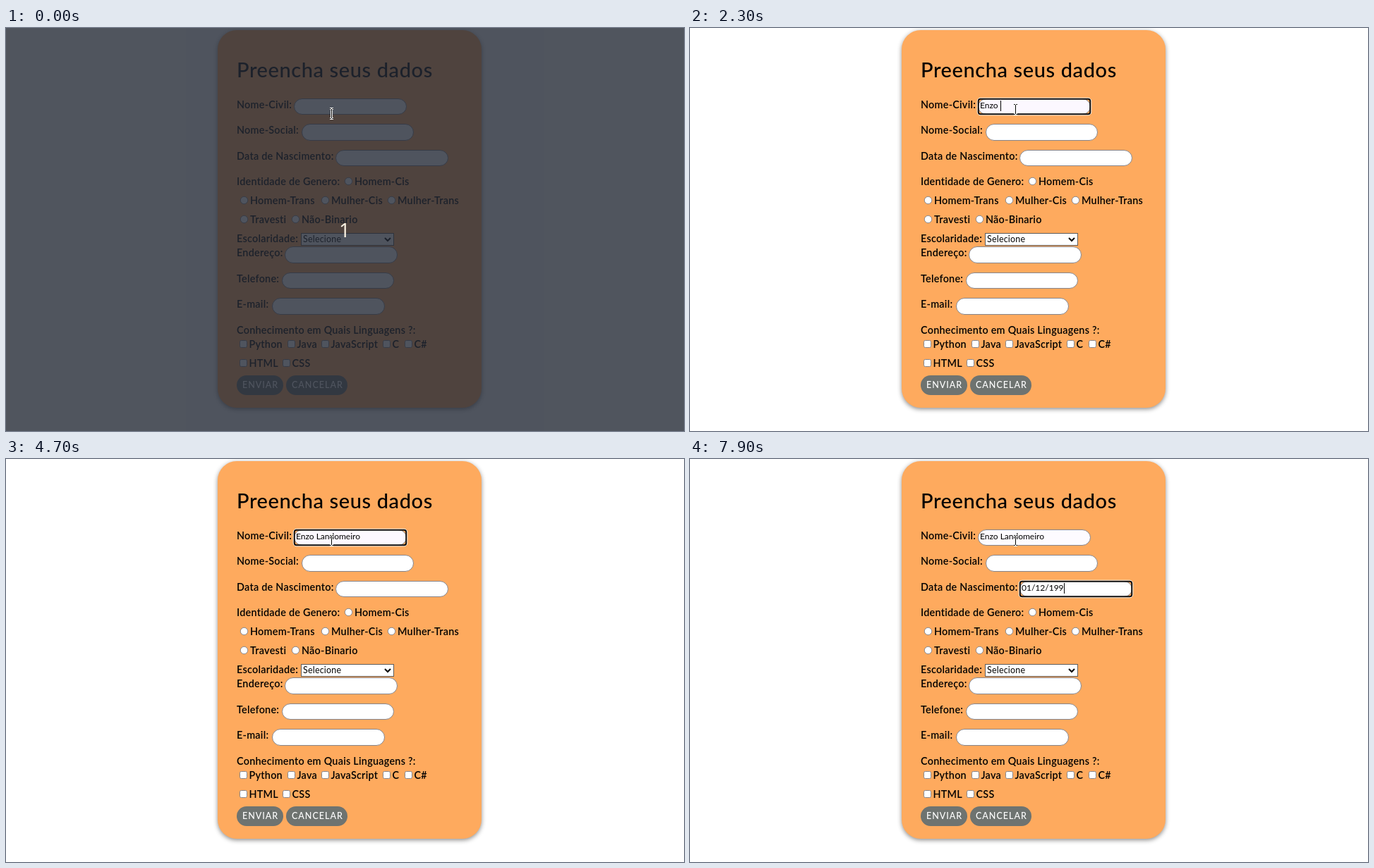
An HTML page that plays this animation: 961 by 572 pixels, repeating every 8000 ms.

```html
<!DOCTYPE html>
<html lang="pt-BR">
<head>
<meta charset="utf-8">
<title>Formulário</title>
<style>
  html, body { margin: 0; width: 100%; height: 100%; overflow: hidden; background: #fff; }
  svg { display: block; width: 961px; height: 572px; font-family: Lato, "Open Sans", sans-serif; }
  #card { filter: drop-shadow(0 2px 3px rgba(0, 0, 0, .45)); }
  .title { font-size: 29px; font-weight: 500; letter-spacing: .6px; }
  .label { font-size: 14.4px; font-weight: 600; letter-spacing: .25px; }
  .value { font-size: 12px; }
  .option { font-size: 12.4px; letter-spacing: .25px; }
  .button { font-size: 12.5px; font-weight: 500; letter-spacing: 1px; fill: #fff; }
  .count { font: 28px "Open Sans", "Noto Sans", sans-serif; fill: #fff6e6; text-anchor: middle; }
  .box { fill: #fff; stroke: #85858c; }
  .ibeam { fill: none; stroke: #fff; stroke-width: 3; }
  .ibeam + .ibeam { stroke: #000; stroke-width: 1; }
</style>
</head>
<body>
<svg id="stage" viewBox="0 0 961 572">
  <rect id="card" x="300" y="3" width="374" height="536" rx="27" fill="#feaa5e"/>
</svg>
<script>
const LOOP = 8000;
const stage = document.getElementById('stage');

function add(tag, attrs, text) {
  const el = document.createElementNS('http://www.w3.org/2000/svg', tag);
  for (const key in attrs) el.setAttribute(key, attrs[key]);
  if (text) el.textContent = text;
  return stage.appendChild(el);
}
const write = (style, x, y, text) => add('text', { class: style, x, y }, text);
const show = (el, on) => el.setAttribute('visibility', on ? 'visible' : 'hidden');

// Text fields: label, baseline, then the box
function field(label, base, x, y, w, h) {
  write('label', 327, base, label);
  const el = add('rect', { class: 'box', x: x + .5, y: y + .5, width: w - 1, height: h - 1, rx: 11.5 });
  return { el, x, y, w, h, base };
}
function radio(x, y, label) {
  add('circle', { class: 'box', cx: x, cy: y, r: 5.2 });
  write('label', x + 8.5, y + 5.5, label);
}
function check(x, y, label) {
  add('rect', { class: 'box', x: x - 5, y: y - 5.5, width: 10, height: 10, rx: 2 });
  write('label', x + 8, y + 5, label);
}
function button(x, w, label) {
  add('rect', { x, y: 493, width: w, height: 28, rx: 14, fill: '#6e7370' });
  write('button', x + 8, 511, label);
}

write('title', 327, 70, 'Preencha seus dados');
const civil = field('Nome-Civil:', 114, 408, 100, 160, 23);
const social = field('Nome-Social:', 150, 419, 136, 159, 24);
const birth = field('Data de Nascimento:', 187, 467, 173, 160, 23);

write('label', 327, 223, 'Identidade de Genero:');
radio(485.5, 217.5, 'Homem-Cis');
radio(337.5, 244.5, 'Homem-Trans');
radio(452.5, 244.5, 'Mulher-Cis');
radio(546.5, 244.5, 'Mulher-Trans');
radio(337.5, 271.5, 'Travesti');
radio(410.5, 271.5, 'Não-Binario');

write('label', 327, 304, 'Escolaridade:');
add('rect', { x: 418.5, y: 291.5, width: 131, height: 17, fill: '#fff', stroke: '#5c5c5c' });
write('option', 421, 304, 'Selecione');
add('path', { d: 'M537 298l4 4 4-4', fill: 'none', stroke: '#000', 'stroke-width': 2 });

field('Endereço:', 324, 395, 310, 160, 24);
field('Telefone:', 361, 391, 347, 159, 23);
field('E-mail:', 397, 377, 383, 160, 24);

write('label', 327, 434, 'Conhecimento em Quais Linguagens ?:');
check(336.5, 449, 'Python');
check(404.5, 449, 'Java');
check(452.5, 449, 'JavaScript');
check(539.5, 449, 'C');
check(570.5, 449, 'C#');
check(336.5, 476, 'HTML');
check(397.5, 476, 'CSS');
button(327, 66, 'ENVIAR');
button(397, 87, 'CANCELAR');

// Focus ring, typed values and caret
const halo = add('rect', { rx: 4.5, fill: 'none', stroke: '#fff' });
const ring = add('rect', { rx: 3, fill: 'none', stroke: '#101010', 'stroke-width': 2 });
const caret = add('rect', { width: 1, height: 15, fill: '#000' });

function typed(target, text, times) {
  target.text = write('value', target.x + 3, target.base, '');
  target.full = text.replace(/ /g, '\u00a0');
  target.times = times;
}
typed(civil, 'Enzo Landomeiro', [1500, 1600, 1800, 2200, 2300, 2700, 3000, 3100,
  3300, 3400, 3600, 3700, 3800, 4000, 4200]);
typed(birth, '01/12/199', [5800, 6000, 6700, 6900, 7000, 7300, 7400, 7700, 7900]);
typed(social, '', []);

const veil = add('rect', { width: 961, height: 572, fill: '#242a36', 'fill-opacity': .8 });
const count = write('count', 480, 297, '1');

const pointer = add('g', {});
const beam = 'M-2.5-7H-1L0-6 1-7H2.5M0-6V6M-2.5 7H-1L0 6 1 7H2.5';
for (let i = 0; i < 2; i++) pointer.append(add('path', { class: 'ibeam', d: beam }));

// Each step holds from its time until the next one
const focusSteps = [[0, null], [300, civil], [5000, social], [5100, birth]];
const pointerSteps = [[0, 121.5], [100, 119.5], [200, 117.5], [300, 115.5]];
const caretSteps = [[0, false], [300, true], [900, false], [1500, true], [4700, false], [5000, true]];
const at = (steps, t) => steps.filter(s => s[0] <= t).pop()[1];

function outline(el, f, grow) {
  el.setAttribute('x', f.x - grow);
  el.setAttribute('y', f.y - grow);
  el.setAttribute('width', f.w + 2 * grow);
  el.setAttribute('height', f.h + 2 * grow);
}

function draw(t) {
  show(veil, t < 100);
  show(count, t < 100);
  pointer.setAttribute('transform', `translate(461.5 ${at(pointerSteps, t)})`);

  for (const f of [civil, social, birth]) {
    f.text.textContent = f.full.slice(0, f.times.filter(s => s <= t).length);
  }
  const focus = at(focusSteps, t);
  civil.el.style.fill = t < 300 ? '#fff' : focus === civil ? '#fcf8ff' : '#fdfbff';
  show(ring, focus);
  show(halo, focus);
  show(caret, focus && at(caretSteps, t));
  if (!focus) return;
  outline(ring, focus, -.75);
  outline(halo, focus, .75);
  const len = focus.text.textContent ? focus.text.getComputedTextLength() : 0;
  caret.setAttribute('x', Math.round(focus.x + 3 + len));
  caret.setAttribute('y', focus.base - 11);
}

const start = performance.now();
function tick() {
  draw((performance.now() - start) % LOOP);
  requestAnimationFrame(tick);
}
tick();
</script>
</body>
</html>
```
